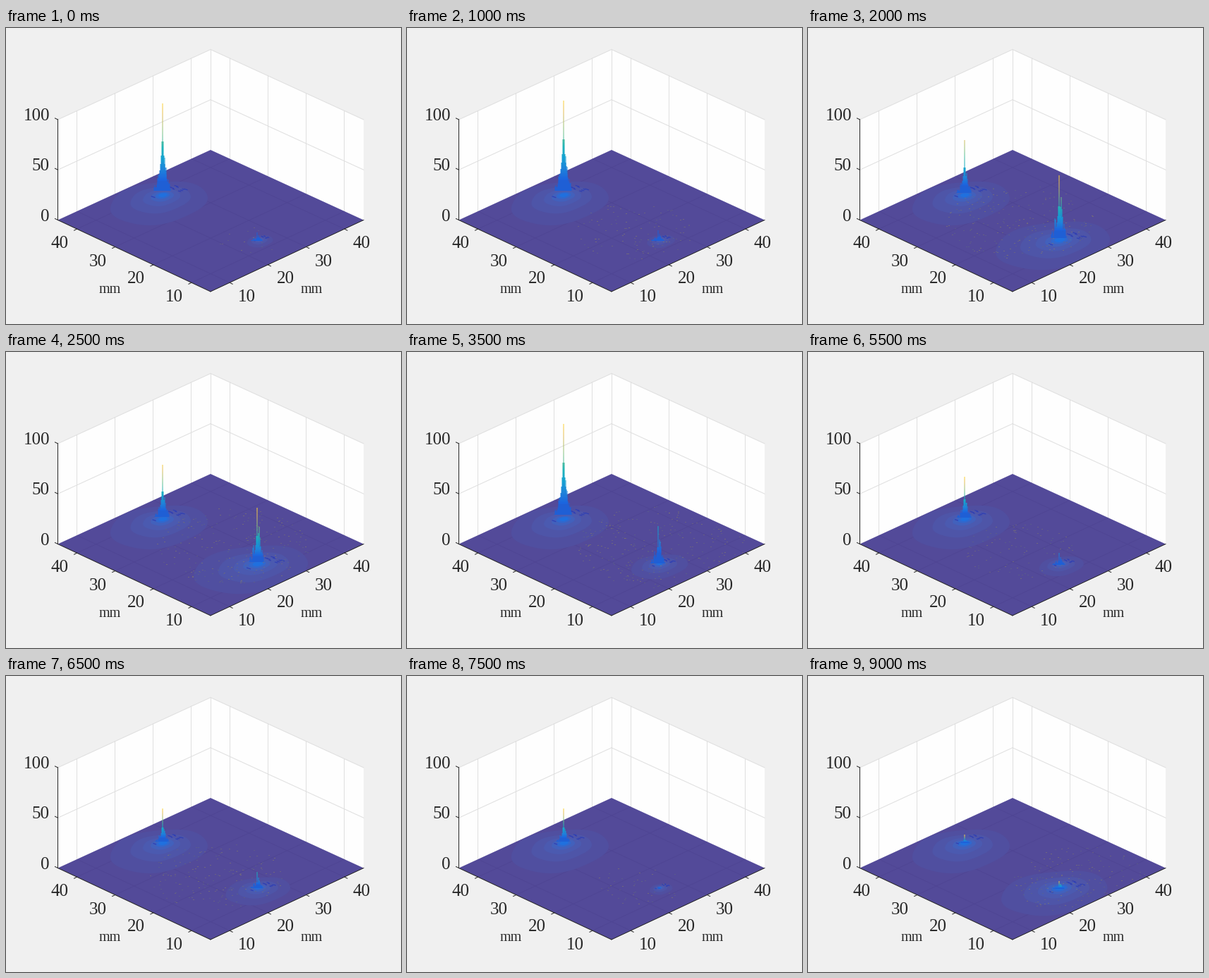
These frames come from a looping animation (560 px wide and 420 px high, 9500 ms). A matplotlib script:

```python
import random

import numpy as np
import matplotlib.pyplot as plt
from matplotlib.animation import FuncAnimation
from matplotlib.collections import LineCollection, PolyCollection
from matplotlib.colors import LinearSegmentedColormap
from matplotlib.patches import Polygon

W, H, DPI = 560, 420, 100
PX = 72 / DPI
LEFT, RIGHT, BACK, FRONT = (73.5, 272.5), (507, 272.5), (290, 173), (290, 374)
TALL = 142.5
INK, GRID = "#262626", "#dfdfdf"

PARULA = LinearSegmentedColormap.from_list("parula", [
    "#352a87", "#0f5cdd", "#127dd8", "#079ccf", "#15b1b4",
    "#59bd8c", "#a5be6b", "#e1b952", "#fcce2e", "#f9fb0e"])
GLOW = LinearSegmentedColormap.from_list("glow", ["#504fa0", "#4a5db4", "#2070de"])
RINGS = [0.62 ** k for k in range(6)]

# Key poses: (step, screen height of the tip), straight moves in between.
TIP_A = [(0, 106), (2, 102), (3, 158), (5, 159), (6, 101), (7, 101),
         (10, 133), (11, 176), (13, 187), (17, 187), (18, 224)]
TIP_B = [(0, 289), (2, 286), (4, 208), (7, 246), (9, 276), (11, 284),
         (13, 277), (15, 298), (18, 290)]
# Drifting cloud of specks: (step, x, y, count).
CLOUD = [(0, 345, 300, 14), (4, 300, 275, 200), (7, 360, 275, 270),
         (9, 300, 280, 24), (13, 300, 283, 160), (15, 330, 295, 45),
         (18, 390, 290, 170)]
BASE_A, BASE_B = 236, 301

fig = plt.figure(figsize=(W / DPI, H / DPI), dpi=DPI, facecolor="#f0f0f0")
ax = fig.add_axes([0, 0, 1, 1])
ax.set_xlim(0, W)
ax.set_ylim(H, 0)
ax.axis("off")


def pose(keys, step):
    steps, *tracks = zip(*keys)
    return [np.interp(step, steps, track) for track in tracks]


def along(p, q, f):
    return p[0] + (q[0] - p[0]) * f, p[1] + (q[1] - p[1]) * f


def lift(p, dy=TALL):
    return p[0], p[1] - dy


def line(p, q, color, z=1):
    xs, ys = zip(p, q)
    if xs[0] == xs[1]:
        xs = [int(xs[0]) + 0.5] * 2
    ax.plot(xs, ys, color=color, lw=PX, zorder=z, snap=False)


def label(x, y, text, size=25, ha="center"):
    ax.text(x, y, text, family="Liberation Serif", fontsize=size * PX,
            color=INK, ha=ha, va="baseline")


def draw_box():
    ax.fill(*zip(LEFT, lift(LEFT), lift(BACK), lift(RIGHT), RIGHT, FRONT),
            color="#fefefe", lw=0, zorder=0)
    line(BACK, lift(BACK), GRID)
    for dy in (TALL / 2, TALL):
        line(lift(LEFT, dy), lift(BACK, dy), GRID)
        line(lift(BACK, dy), lift(RIGHT, dy), GRID)
    for i in range(4):
        f = (5 + 10 * i) / 40
        for side, other, sign in ((LEFT, RIGHT, -1), (RIGHT, LEFT, 1)):
            wall, edge = along(BACK, side, f), along(FRONT, side, f)
            line(wall, along(other, FRONT, f), GRID)
            line(wall, lift(wall), GRID)
            line(edge, (edge[0] + 4 * sign, edge[1] + 2), INK, z=6)
            label(290 + sign * (51.8 + 54.2 * i), 387.5 - 25 * i, str(10 * i + 10))
    for value in (0, 50, 100):
        p = lift(LEFT, TALL * value / 100)
        line(p, (p[0] - 4, p[1] - 2), INK, z=6)
        label(62, p[1] + 1.2, str(value), ha="right")
    line(LEFT, lift(LEFT), INK, z=6)
    line(LEFT, FRONT, INK, z=6)
    line(FRONT, RIGHT, INK, z=6)
    line(lift(FRONT, -1), lift(RIGHT, -1), "#fefefe", z=5.5)
    label(147, 376, "mm", 20)
    label(433, 376, "mm", 20)


def halo(center, peak, rx, ry):
    """Nested, slightly sheared rings that gather towards the peak."""
    a = np.linspace(0, 2 * np.pi, 72, endpoint=False)
    r = 1 + 0.025 * np.cos(3 * a + 1) + 0.02 * np.sin(5 * a)
    rings = []
    for scale in RINGS:
        x, y = along(peak, center, scale)
        dx, dy = rx * scale * r * np.cos(a), ry * scale * r * np.sin(a)
        rings.append(np.column_stack([x + dx, y + dy - 0.11 * dx]))
    return rings


def marks(x, y, size):
    rng = random.Random(3)
    out = []
    for k in range(9):
        px, py = x + (9 + 2.8 * k) * size, y + rng.uniform(-8, 0) * size
        n = rng.uniform(3, 6) * size
        out.append([(px, py), (px + n, py + 0.3 * n)])
    out.append([(x - 17 * size, y + 8 * size), (x - 11 * size, y + 10 * size)])
    return out


def spike(x, base, tip, ratio, shoulder):
    """One-pixel rows of a needle with smaller needles around its foot."""
    tall = base - tip
    base -= 0.05 * tall
    foot = 3 + 0.06 * tall
    rows, colors = [], []
    for y in range(int(tip), int(base) + 1):
        t = (base - y) / (base - tip)
        parts = [(0, max(0.5, foot * np.exp(-4.2 * t)))]
        for k in range(6):
            top = shoulder * 0.7 ** k
            if t < top:
                dx = (-1 if k % 3 == 2 else 1) * (3 + 1.5 * k) * (0.5 + foot / 20)
                parts.append((dx, 1.6 * (1 - t / top) + 0.4))
        color = 0.95 * np.array(PARULA(max(0.1, 0.9 * ratio * t))[:3]) + 0.05
        for dx, half in parts:
            rows.append([(x + dx - half, y + 0.5), (x + dx + half, y + 0.5)])
            colors.append(color)
    return rows, colors


def on_floor(x, y):
    edge = BACK[1] if y < LEFT[1] else FRONT[1]
    return abs(x - 290) / 217 + abs((y - LEFT[1]) / (edge - LEFT[1])) < 0.97


def specks(step):
    rng = random.Random(40 + step)
    cx, cy, count = pose(CLOUD, step)
    spread = 20 + 6 * count ** 0.5
    rows, colors = [], []
    for _ in range(int(count)):
        a, r = rng.uniform(0, 2 * np.pi), spread * rng.random() ** 0.5
        x, y = int(cx + r * np.cos(a)), int(cy + 0.5 * r * np.sin(a))
        if on_floor(x, y):
            rows.append([(x, y + 0.5), (x + 1, y + 0.5)])
            colors.append(rng.choice(["#7b7470", "#67687a", "#8b8462", "#5f6b80"]))
    return rows, colors


draw_box()
floor = Polygon([LEFT, BACK, RIGHT, FRONT], facecolor="#352a87", alpha=0.85,
                lw=0, zorder=2)
ax.add_patch(floor)
halos = PolyCollection([], facecolors=GLOW(np.linspace(0, 1, len(RINGS))),
                       edgecolors="none", zorder=3)
dashes = LineCollection([], colors="#2f3fb4", linewidths=1.2 * PX, zorder=4)
dots = LineCollection([], linewidths=PX, capstyle="butt", zorder=4)
needles = LineCollection([], linewidths=PX, capstyle="butt", zorder=5)
for item in (halos, dashes, dots, needles):
    ax.add_collection(item, autolim=False)
halos.set_clip_path(floor)


def update(step):
    (tip_a,), (tip_b,) = pose(TIP_A, step), pose(TIP_B, step)
    high_a, high_b = BASE_A - tip_a, BASE_B - tip_b
    top = max(high_a, high_b)
    ra, rb = high_a / top, high_b / top
    halos.set_verts(
        halo((216, 248), (223, 236), 69, 30)
        + halo((360 - 14 * rb ** 2, 302 + 6 * rb), (358, 300), 12 + 69 * rb, 6 + 27 * rb))
    dashes.set_segments(marks(222, 231, 0.7 + 0.002 * high_a)
                        + marks(358, 298, 0.35 + 0.65 * rb))
    rows, colors = specks(step)
    dots.set_segments(rows)
    dots.set_color(colors)
    rows_a, colors_a = spike(221.5, BASE_A, tip_a, ra, 0.38)
    rows_b, colors_b = spike(355.5, BASE_B, tip_b, rb, 0.66)
    needles.set_segments(rows_a + rows_b)
    needles.set_color(colors_a + colors_b)
    return halos, dashes, dots, needles


anim = FuncAnimation(fig, update, frames=19, interval=500, repeat=True,
                     repeat_delay=0, blit=False)
plt.show()
```
